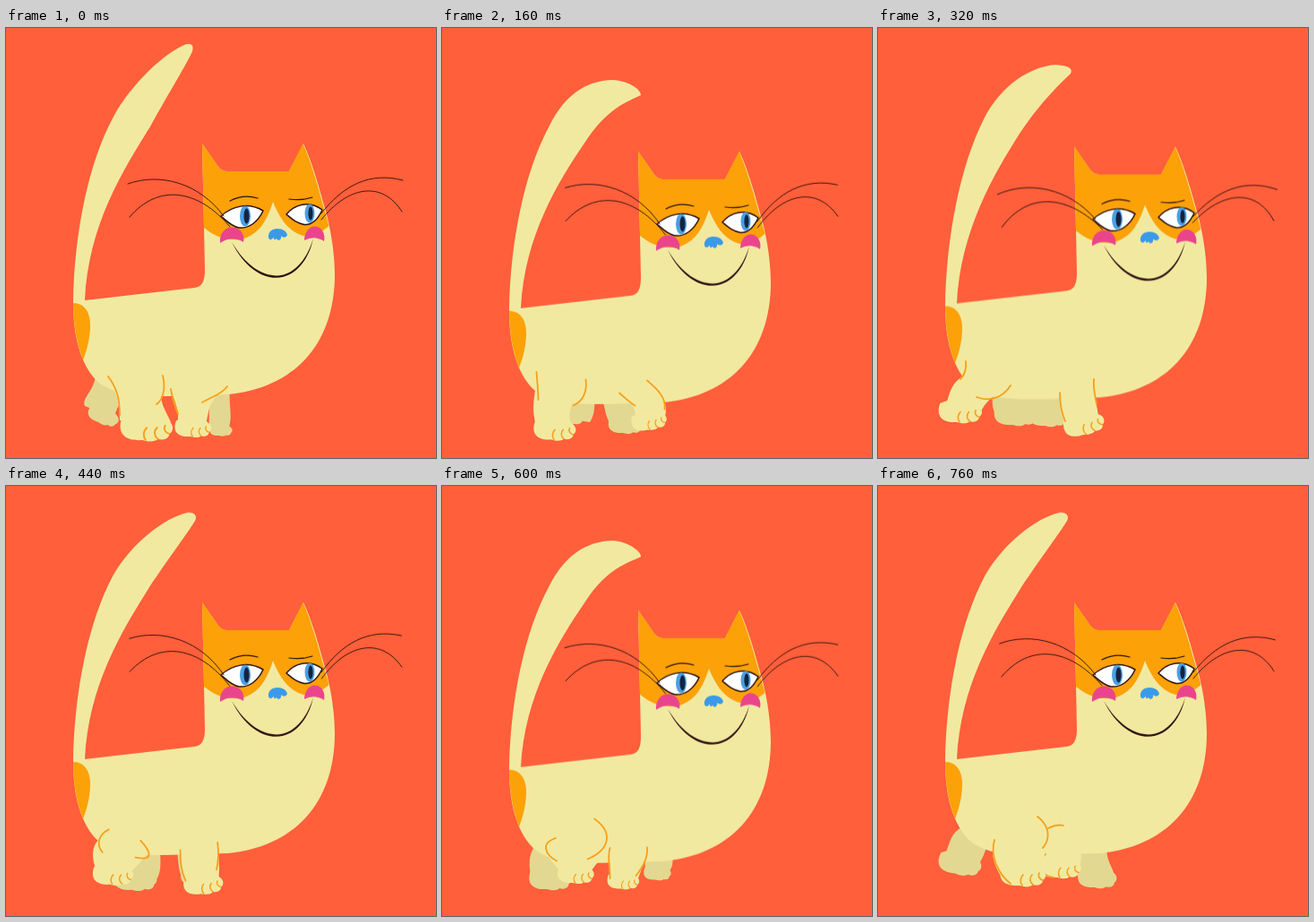
An HTML page without scripts for the animation above (0.8 s loop, 480 by 480 pixels).

```html
<!DOCTYPE html>
<html lang="en">
<head>
<meta charset="utf-8">
<title>Walking cat</title>
<style>
html, body { margin: 0; width: 100%; height: 100%; overflow: hidden; background: #ff5f3a; }
svg { display: block; width: 100vw; height: 100vh; }
.cream { fill: #f2e9a0; }
.shade { fill: #e3d891; }
.orange { fill: #fca108; }
.ink { fill: none; stroke: #2a1212; stroke-linecap: round; }
.crease { fill: none; stroke: #f5a01c; stroke-width: 1.8; stroke-linecap: round; }
.toes { stroke: #f5a01c; stroke-width: 1.7; stroke-linecap: round; }

/* body, tail and whiskers repeat twice per stride */
.bob, .tail, .whisk { animation: bob .4s step-end -2ms infinite; }
.tail { animation-name: tail; }
.whisk { animation-name: whisk; }
@keyframes bob {
  0% { transform: translateY(0); }
  10%, 90% { transform: translateY(.9px); }
  20%, 80% { transform: translateY(3.4px); }
  30%, 70% { transform: translateY(6.3px); }
  40%, 60% { transform: translateY(8.8px); }
  50% { transform: translateY(9.7px); }
}
@keyframes tail {
  0% { d: path("M75 307C76 230 92 150 120 99C140 62 178 27 200 18.5C207 16 210 20 208 26C203 38 182 72 161 110C130 160 92 220 88 304Z"); }
  10%, 90% { d: path("M75 308C76 231 92 150 120 99C140 65 175 36 203 29.5C210 29 214 33 211 39C203 52 182 80 160 113C130 161 92 222 88 305Z"); }
  20%, 80% { d: path("M75 311C76 234 92 153 118 102C137 64 170 43 198 41C213 42 218 45 215 51C200 65 180 85 158 118C130 162 92 226 88 307Z"); }
  30%, 70% { d: path("M75 314C76 237 92 156 120 106C139 70 166 52 194 50.5C208 52 220 57 219 65C206 76 184 88 159 123C130 167 92 230 88 310Z"); }
  40%, 60% { d: path("M75 316C76 240 92 160 120 109C137 75 160 59 190 58C210 59 222 69 222 75C207 82 184 90 160 127C130 171 92 232 88 313Z"); }
  50% { d: path("M75 317C76 241 92 162 120 111C137 78 160 62 190 61C209 62 223 74 222 79C207 86 184 92 160 129C130 173 92 234 88 314Z"); }
}
.whisk.left { --side: 1deg; transform-origin: 245px 212px; }
.whisk.right { --side: -1deg; transform-origin: 353px 206px; }
@keyframes whisk {
  0% { rotate: 0deg; }
  10% { rotate: calc(2.5 * var(--side)); }
  20% { rotate: calc(4.5 * var(--side)); }
  30% { rotate: calc(3.1 * var(--side)); }
  40% { rotate: calc(2.4 * var(--side)); }
  50% { rotate: calc(1.7 * var(--side)); }
  60% { rotate: calc(.9 * var(--side)); }
  70% { rotate: calc(-3.4 * var(--side)); }
  80% { rotate: calc(-4.3 * var(--side)); }
  90% { rotate: calc(-.5 * var(--side)); }
}

/* legs: key poses, stepped at 25 frames per second */
.legs path, .legs use { animation: .8s steps(2) -2ms infinite; }
.legs .nh { animation-name: nh; }
.legs .nh-crease { animation-name: nh-crease; }
.legs .nh-paw { animation-name: nh-paw; }
.legs .nf { animation-name: nf; }
.legs .nf-crease { animation-name: nf-crease; }
.legs .nf-paw { animation-name: nf-paw; }
.legs .fh { animation-name: fh; }
.legs .fh-paw { animation-name: fh-paw; }
.legs .ff { animation-name: ff; }
.legs .ff-paw { animation-name: ff-paw; }

@keyframes nh {
  0%, 100% { d: path("M113 388C122 402 127 420 127 438L184 440C178 425 168 418 176 388Z"); }
  10% { d: path("M112 392C113 410 108 425 124 444L166 442C152 432 150 422 168 398Z"); animation-timing-function: steps(4); }
  30% { d: path("M98 376C99 410 88 412 86 444L124 448C130 435 128 428 153 390Z"); }
  40% { d: path("M97 388C80 395 80 412 74 425L112 436C116 425 118 416 148 398Z"); animation-timing-function: steps(5); }
  65% { d: path("M125 390C105 395 104 412 118 430L156 432C160 425 184 420 178 386Z"); animation-timing-function: steps(4); }
  85% { d: path("M125 395C118 405 128 415 145 428L179 426C180 420 195 400 183 370Z"); }
  95% { d: path("M130 395C124 410 132 432 142 440L184 432C182 420 190 412 186 380Z"); animation-timing-function: steps(1); }
}
@keyframes nh-crease {
  0%, 100% { d: path("M114 389C124 402 127 415 127 432M175 388C179 405 174 416 168 420"); }
  10% { d: path("M113 393C112 405 114 418 118 425M168 397C170 412 163 422 154 427"); animation-timing-function: steps(4); }
  30% { d: path("M98 375C101 388 101 398 97 405M153 388C155 402 150 412 139 416"); }
  40% { d: path("M98 372C99 382 96 388 92 392M110 412C125 418 140 412 148 399"); animation-timing-function: steps(5); }
  65% { d: path("M126 391C102 396 106 412 118 420M177 385C187 402 182 424 142 425"); animation-timing-function: steps(4); }
  85% { d: path("M128 395C116 402 126 412 138 417M163 358C192 368 198 385 183 408"); }
  95% { d: path("M130 395C125 412 133 432 148 444M178 369C190 378 194 392 184 404"); animation-timing-function: steps(1); }
}
@keyframes nh-paw {
  0%, 100% { translate: 157px 460px; scale: 1.15; }
  10% { translate: 148px 460px; scale: .95; animation-timing-function: steps(4); }
  30% { translate: 104px 459px; scale: .9; }
  40% { translate: 92px 440px; scale: .95; animation-timing-function: steps(5); }
  65% { translate: 138px 448px; scale: .85; animation-timing-function: steps(4); }
  85% { translate: 161px 438px; scale: .75; }
  95% { translate: 162px 446px; scale: 1; animation-timing-function: steps(1); }
}
@keyframes nf {
  0%, 100% { d: path("M184 403C188 418 195 428 191 442L222 445C228 430 222 418 247 400Z"); }
  10% { d: path("M192 402C196 415 204 425 200 442L236 445C238 430 234 420 236 405Z"); animation-timing-function: steps(4); }
  30% { d: path("M205 413C222 415 230 420 232 430L262 422C268 410 255 388 222 383Z"); }
  40% { d: path("M203 407C205 425 204 435 211 446L244 444C250 430 240 420 241 392Z"); animation-timing-function: steps(5); }
  65% { d: path("M190 405C188 425 192 435 196 448L230 446C234 430 234 415 234 403Z"); animation-timing-function: steps(4); }
  85% { d: path("M184 402C188 415 182 425 180 434L205 438C212 425 220 418 225 405Z"); }
  95% { d: path("M190 388C190 405 180 410 181 425L215 436C228 430 230 410 222 398Z"); animation-timing-function: steps(1); }
}
@keyframes nf-crease {
  0%, 100% { d: path("M184 403C186 416 190 425 192 431M247 400C240 410 228 412 219 418"); }
  10% { d: path("M192 402C194 415 197 422 203 425M236 404C231 415 240 425 232 436"); animation-timing-function: steps(4); }
  30% { d: path("M204 413C215 411 222 414 228 418M222 383C243 386 262 398 265 415"); }
  40% { d: path("M203 407C203 422 206 432 209 439M241 392C240 405 243 412 244 420"); animation-timing-function: steps(5); }
  65% { d: path("M189 406C188 422 191 434 195 442M233 402C236 412 233 425 229 434"); animation-timing-function: steps(4); }
  85% { d: path("M186 402C180 412 185 422 180 434M225 405C224 418 214 428 204 436"); }
  95% { d: path("M187 411C178 418 180 435 196 437M190 382C198 378 203 378 207 379"); animation-timing-function: steps(1); }
}
@keyframes nf-paw {
  0%, 100% { translate: 209px 456px; scale: .8; rotate: 0deg; }
  10% { translate: 219px 457px; scale: .85; rotate: 0deg; animation-timing-function: steps(4); }
  30% { translate: 247px 439px; scale: .7; rotate: -20deg; }
  40% { translate: 233px 453px; scale: .9; rotate: -15deg; animation-timing-function: steps(5); }
  65% { translate: 214px 456px; scale: .85; rotate: 0deg; animation-timing-function: steps(4); }
  85% { translate: 191px 443px; scale: .55; rotate: 0deg; }
  95% { translate: 204px 437px; scale: .9; rotate: 0deg; animation-timing-function: steps(1); }
}
@keyframes fh {
  0%, 100% { d: path("M100 385C100 405 84 412 88 422L120 434C125 425 130 410 130 395Z"); }
  10% { d: path("M104 395C110 412 106 420 104 432L150 440C155 430 150 410 150 400Z"); animation-timing-function: steps(4); }
  30% { d: path("M135 405C133 425 132 425 138 434L180 440C190 430 190 415 190 405Z"); }
  40% { d: path("M128 405C127 425 128 428 136 436L180 440C190 430 190 415 190 405Z"); animation-timing-function: steps(5); }
  65% { d: path("M110 405C106 420 108 432 116 444L155 445C165 435 160 420 160 405Z"); animation-timing-function: steps(4); }
  85% { d: path("M100 395C85 402 86 420 84 432L122 436C130 420 134 412 134 400Z"); }
  95% { d: path("M95 380C75 390 82 410 69 416L108 428C118 418 122 400 125 390Z"); animation-timing-function: steps(1); }
}
@keyframes fh-paw {
  0%, 100% { translate: 106px 441px; scale: .7; rotate: 20deg; }
  10% { translate: 120px 441px; scale: .8; rotate: 0deg; animation-timing-function: steps(4); }
  30% { translate: 156px 444px; scale: .9; rotate: 0deg; }
  40% { translate: 154px 443px; scale: .95; rotate: 0deg; animation-timing-function: steps(5); }
  65% { translate: 138px 456px; scale: .95; rotate: 0deg; animation-timing-function: steps(4); }
  85% { translate: 104px 444px; scale: .9; rotate: 0deg; }
  95% { translate: 90px 433px; scale: .95; rotate: 8deg; animation-timing-function: steps(1); }
}
@keyframes ff {
  0%, 100% { d: path("M225 400C228 420 226 435 227 446L248 448C254 435 248 420 250 400Z"); }
  10% { d: path("M205 400C208 425 208 435 210 444L236 442C240 430 238 420 240 400Z"); animation-timing-function: steps(4); }
  30% { d: path("M150 405C155 430 160 440 168 442L208 440C218 425 215 420 216 405Z"); }
  40% { d: path("M155 405C155 425 160 430 170 438L205 438C213 430 212 420 212 405Z"); animation-timing-function: steps(5); }
  65% { d: path("M215 405C218 425 215 430 215 438L238 438C244 430 242 420 242 405Z"); animation-timing-function: steps(4); }
  85% { d: path("M234 400C236 415 238 420 240 428L266 426C276 418 272 412 272 395Z"); }
  95% { d: path("M220 400C224 415 220 430 224 438L262 438C268 430 252 420 256 400Z"); animation-timing-function: steps(1); }
}
@keyframes ff-paw {
  0%, 100% { translate: 240px 455px; scale: .5; }
  10% { translate: 222px 452px; scale: .6; animation-timing-function: steps(4); }
  30% { translate: 188px 452px; scale: .9; }
  40% { translate: 190px 444px; scale: .85; animation-timing-function: steps(5); }
  65% { translate: 227px 445px; scale: .55; animation-timing-function: steps(4); }
  85% { translate: 254px 434px; scale: .65; }
  95% { translate: 245px 448px; scale: .85; animation-timing-function: steps(1); }
}
</style>
</head>
<body>
<svg viewBox="0 0 480 480">
  <defs>
    <g id="paw">
      <path stroke="none" d="M-24-22C-30-4-18 1-4 0C2 2 8 2 11-1C17 1 22-2 22-6C27-9 26-16 21-19C14-27-10-30-24-22Z"/>
      <path fill="none" d="M-1 0C-4-4-3-9 0-12M11-1C7-4 7-9 10-12M22-6C18-7 16-11 18-14"/>
    </g>
  </defs>
  <rect width="480" height="480" fill="#ff5f3a"/>

  <g class="legs shade">
    <path class="ff"/><use class="ff-paw" href="#paw"/>
    <path class="fh"/><use class="fh-paw" href="#paw"/>
  </g>

  <path class="tail cream"/>
  <g class="bob">
    <path class="cream" d="M75 307C75 340 82 378 105 397C125 411 150 411 180 411L248 409C320 402 367 355 367 275C367 245 360 215 357 205C350 180 342 150 332 129L316 160H247Q241 160 237 155L219 129L222 270C222 284 218 289 210 290L88 304L86 298H77Z"/>
    <path class="orange" d="M75 307C88 307 95 318 94 335C93 352 89 362 86 371C79 352 75 330 75 307Z"/>
    <path class="orange" d="M219 129L237 155Q241 160 247 160H316L331.500 129C341 150 349 180 356 205L360.500 221C350 229 345 234 332 232C312 226 304 208 298 194C292 212 284 231 262 236C242 238 230 230 221 223Z"/>
  </g>

  <g class="legs cream">
    <path class="nf"/><use class="nf-paw toes" href="#paw"/><path class="nf-crease crease"/>
    <path class="nh"/><use class="nh-paw toes" href="#paw"/><path class="nh-crease crease"/>
  </g>

  <g class="bob">
    <g fill="#fff" stroke="#2a1212" stroke-width="1.500" stroke-linejoin="round">
      <path d="M240 210C252 199 270 194 287 204C281 217 271 224 260 223C251 221 246 215 240 210Z"/>
      <path d="M313 208C322 197 338 192 353 203C348 214 341 220 333 219.500C324 218 319 213 313 208Z"/>
    </g>
    <g fill="#4a9fe3">
      <ellipse cx="267" cy="210" rx="6" ry="11.500"/>
      <ellipse cx="339" cy="207" rx="5.500" ry="10.500"/>
    </g>
    <g fill="#14233f">
      <ellipse cx="268.500" cy="210" rx="3" ry="8.500"/>
      <ellipse cx="340" cy="207" rx="2.600" ry="7.500"/>
    </g>
    <path class="ink" stroke-width="1.200" d="M250 193Q265 185 281 190M316 191Q330 193 342 189"/>
    <g class="whisk left ink" stroke-width=".9">
      <path d="M243 210C216 173 172 161 136 174M250 222C215 180 170 173 138 211"/>
    </g>
    <g class="whisk right ink" stroke-width=".9">
      <path d="M352 207C376 176 406 160 443 170M352 214C382 176 420 170 442 205"/>
    </g>
    <g fill="#ea458c">
      <path d="M239 240C238 229 245 222 253 222.500C262 223 267 231 265 239Q252 231 239 240Z"/>
      <path d="M333 237C333 228 339 221 345 221.500C353 222 357 231 355 238Q344 231 333 237Z"/>
    </g>
    <path fill="#3a9ae8" d="M293 234C292 228 297 224 303 224C309 224 313 227 314 231C312 235 309 234 307 232C308 236 304 239 302 235C300 238 298 235 299 233C297 237 294 237 293 234Z"/>
    <path fill="#2a1212" d="M252 239C268 266 286 276 302 276.500C320 276 335 261 343 235C337 263 320 278.500 302 278.800C285 279 266 267 252 239Z"/>
  </g>
</svg>
</body>
</html>
```
